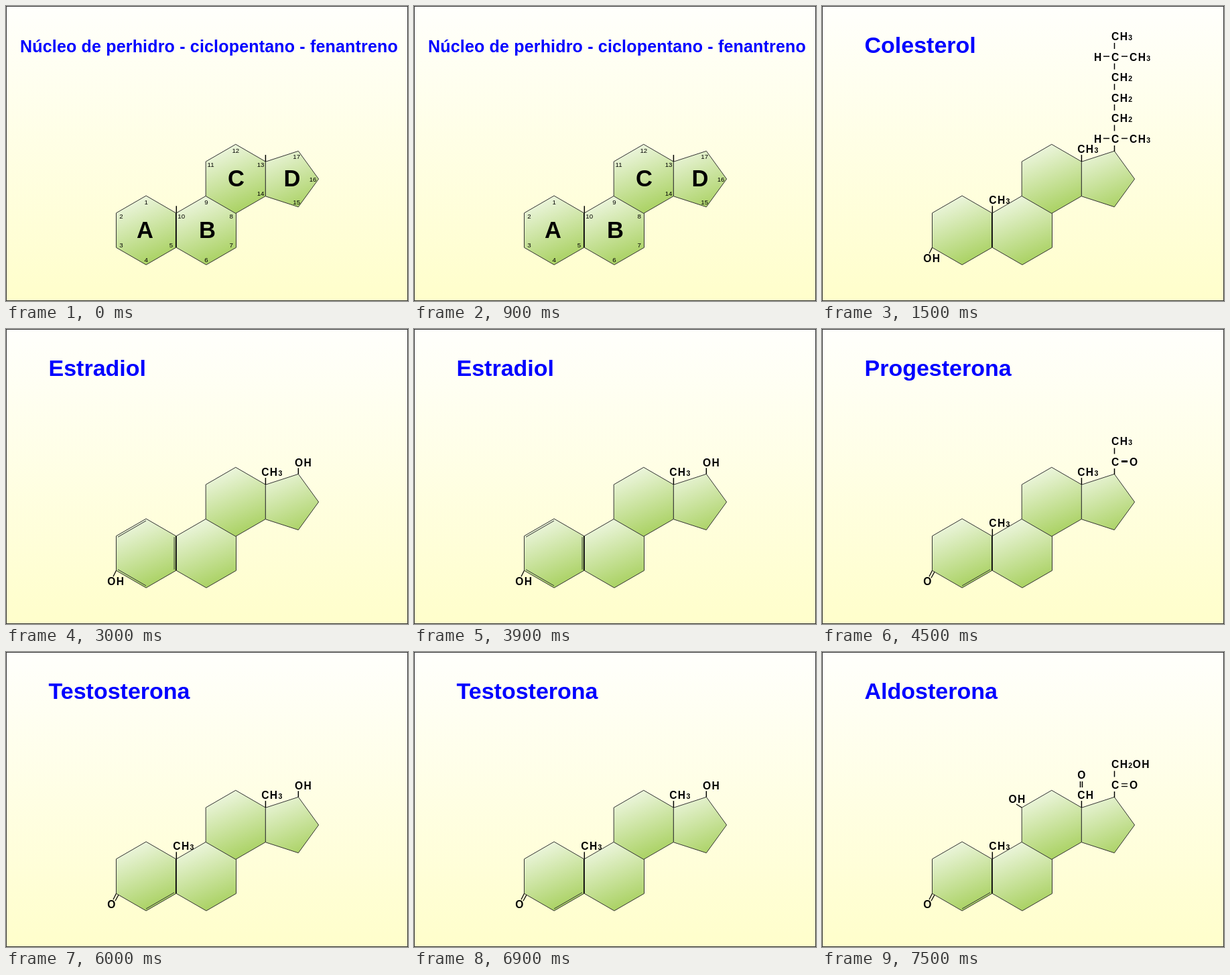
Write an HTML page with a canvas that moves like this. It is 600 px wide and 440 px high and loops after 8000 ms.

```html
<!DOCTYPE html>
<html lang="es">
<head>
<meta charset="utf-8">
<title>Esteroides</title>
<style>
  html, body { margin: 0; width: 100%; height: 100%; overflow: hidden; }
  canvas { display: block; width: 600px; height: 440px; }
</style>
</head>
<body>
<canvas id="stage" width="600" height="440"></canvas>
<script>
const ctx = document.getElementById('stage').getContext('2d');
const FONT = '"Liberation Sans", Arial, sans-serif';
const LOOP = 8000, STEP = 1500;
const BOND = 51.5;                    // side of every ring
const SIDE_X = 432, SIDE_Y = 204;     // lowest carbon of the side chain
const ROW = 30.6;                     // height of one chain link

// Vertices run counter-clockwise from the angle `from`; 0 marks a shared carbon
const RINGS = [
  { name: 'A', x: 209.1, y: 334.5, sides: 6, from: 90, labelX: 207.5, carbons: [1, 2, 3, 4, 5, 0] },
  { name: 'B', x: 298.9, y: 334.5, sides: 6, from: 90, labelX: 300.5, carbons: [9, 10, 0, 6, 7, 8] },
  { name: 'C', x: 342.8, y: 257.8, sides: 6, from: 90, labelX: 343.5, carbons: [12, 11, 0, 0, 14, 13] },
  { name: 'D', x: 422.8, y: 258, sides: 5, from: 0, labelX: 427, carbons: [16, 17, 0, 0, 15] }
];
const ringA = RINGS[0];

// Vertex i of a ring, moved inwards by `inset` pixels
function vertex(ring, i, inset = 0) {
  const r = BOND / (2 * Math.sin(Math.PI / ring.sides)) - inset;
  const a = (ring.from + i * 360 / ring.sides) * Math.PI / 180;
  return [ring.x + r * Math.cos(a), ring.y - r * Math.sin(a)];
}

const carbon = [];
for (const ring of RINGS) {
  ring.carbons.forEach((n, i) => { if (n) carbon[n] = vertex(ring, i); });
}

function text(str, x, y, size, { weight = 'bold', color = '#000', align = 'left', gap = 0 } = {}) {
  ctx.font = `${weight} ${size}px ${FONT}`;
  ctx.letterSpacing = gap + 'px';
  ctx.fillStyle = color;
  ctx.textAlign = align;
  ctx.fillText(str, x, y);
}

function title(str, x = 63.5, y = 70, size = 34, gap = 0) {
  text(str, x, y, size, { color: '#0000ff', gap });
}

function line([x1, y1], [x2, y2], width = 1.3, color = '#000') {
  ctx.strokeStyle = color;
  ctx.lineWidth = width;
  ctx.beginPath();
  ctx.moveTo(x1, y1);
  ctx.lineTo(x2, y2);
  ctx.stroke();
}

const up = ([x, y], length) => line([x, y], [x, y - length], 1.5);
const dash = (x, y, width) => line([x, y], [x + 9, y], width);

// Chemical formula; digits become small subscripts
function formula(str, x, y) {
  for (const ch of str) {
    const digit = ch >= '0' && ch <= '9';
    text(ch, x, y, digit ? 10.5 : 15.6);
    x += ctx.measureText(ch).width + (digit ? 0.6 : 1.4);
  }
}

function background() {
  const g = ctx.createLinearGradient(0, 0, 0, 440);
  g.addColorStop(0, '#fffffc');
  g.addColorStop(1, '#fffecb');
  ctx.fillStyle = g;
  ctx.fillRect(0, 0, 600, 440);
  ctx.strokeStyle = '#333';
  ctx.lineWidth = 1;
  ctx.strokeRect(0.5, 0.5, 599, 439);
}

function drawRing(ring) {
  const { x, y } = ring;
  const g = ctx.createLinearGradient(x - 22, y - BOND, x + 20, y + BOND);
  g.addColorStop(0, '#f1f8e6');
  g.addColorStop(1, '#a5cf5a');
  ctx.beginPath();
  ring.carbons.forEach((n, i) => ctx.lineTo(...vertex(ring, i)));
  ctx.closePath();
  ctx.fillStyle = g;
  ctx.fill();
  ctx.strokeStyle = '#333';
  ctx.lineWidth = 1;
  ctx.stroke();
}

function labelRing(ring) {
  text(ring.name, ring.labelX, ring.y + 11, 34.5, { align: 'center' });
  ring.carbons.forEach((n, i) => {
    if (!n) return;
    const [x, y] = vertex(ring, i, 8.5);
    text(n, x, y + 4, 9.7, { weight: 'normal', align: 'center' });
  });
}

// Second line of a double bond in ring A, starting at vertex i
function doubleBond(i) {
  line(vertex(ringA, i, 3), vertex(ringA, i + 1, 3), 1, '#333');
}

function on18(str) {
  formula(str, 381.2, 219);
  up(carbon[13], 10);
}

function methyl19() {
  formula('CH3', 249.3, 295);
  up(carbon[10], 10.5);
}

function on3(str) {
  const [x, y] = carbon[3];
  formula(str, 151.3, 382);
  line([x, y], [x - 4.5, y + 9]);
}

// Ketone on carbon 3 with the double bond 4-5
function enone() {
  const [x, y] = carbon[3];
  on3('O');
  line([x + 3.5, y + 2], [x - 1.5, y + 11]);
  doubleBond(3);
}

// Side chain link k with the bond below it
function link(str, k) {
  const y = SIDE_Y - ROW * k;
  formula(str, SIDE_X, y);
  up([436.5, y + 13], 9);
}

function branch(k) {
  const y = SIDE_Y - ROW * k;
  link('C', k);
  formula('H', 406, y);
  formula('CH3', 459, y);
  dash(420, y - 6.5, 1.5);
  dash(447, y - 6.5, 1.5);
}

function acyl(end) {
  link('C', 0);
  link(end, 1);
  formula('O', 459, SIDE_Y);
}

function hydroxyl17() {
  formula('OH', 431, 205);
  up(carbon[17], 9);
}

const scenes = [
  function nucleus() {
    title('Núcleo de perhidro - ciclopentano - fenantreno', 21, 69, 25, 0.18);
    up(carbon[13], 10);
    up(carbon[10], 10.5);
    RINGS.forEach(labelRing);
  },
  function cholesterol() {
    title('Colesterol');
    on18('CH3');
    methyl19();
    on3('OH');
    branch(0);
    for (let k = 1; k <= 3; k++) link('CH2', k);
    branch(4);
    link('CH3', 5);
  },
  function estradiol() {
    title('Estradiol');
    on18('CH3');
    on3('OH');
    hydroxyl17();
    for (let i = 0; i < 6; i += 2) doubleBond(i);
  },
  function progesterone() {
    title('Progesterona');
    on18('CH3');
    methyl19();
    enone();
    acyl('CH3');
    dash(447, 197.5, 3);
  },
  function testosterone() {
    title('Testosterona');
    on18('CH3');
    methyl19();
    enone();
    hydroxyl17();
  },
  function aldosterone() {
    title('Aldosterona');
    on18('CH');
    methyl19();
    enone();
    acyl('CH2OH');
    dash(447, 196.5);
    dash(447, 200.5);
    formula('O', 381.2, 189);
    up([385.5, 202], 9);
    up([388.5, 202], 9);
    formula('OH', 278.5, 225);
    line([290, 227], carbon[11]);
  }
];

const start = performance.now();

function frame() {
  const t = (performance.now() - start) % LOOP;
  background();
  RINGS.forEach(drawRing);
  up(vertex(ringA, 4), BOND);
  scenes[Math.floor(t / STEP)]();
  requestAnimationFrame(frame);
}
frame();
</script>
</body>
</html>
```
